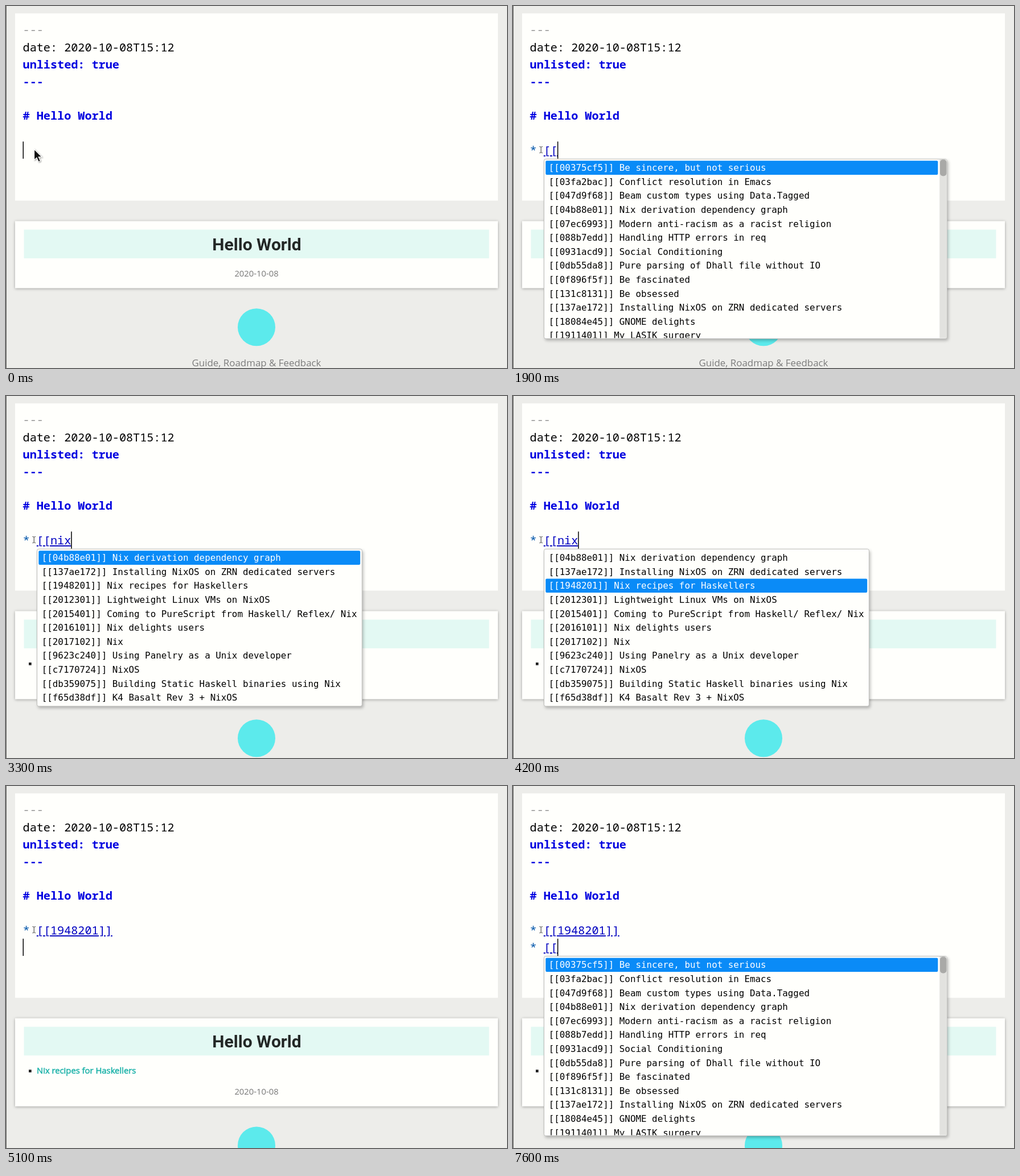
An HTML page that plays this animation: 880 by 637 pixels, repeating every 8000 ms.

```html
<!DOCTYPE html>
<html lang="en">
<head>
<meta charset="utf-8">
<title>Note editor with link completion</title>
<style>
html, body { margin: 0; width: 100%; height: 100%; overflow: hidden; background: #ededea; }
svg { display: block; width: 880px; height: 637px; }
text { white-space: pre; }
.code { font: 20.16px "Noto Sans Mono", "DejaVu Sans Mono", monospace; }
.head { font-weight: 700; fill: #0000e0; }
.link { fill: #0000c0; text-decoration: underline; }
.hint { font: 15.87px "DejaVu Sans Mono", monospace; }
.body { font-family: "Open Sans", "Noto Sans", sans-serif; font-size: 14.8px; }
.title { font: 700 30px Roboto, sans-serif; fill: #232726; }
.mid { text-anchor: middle; }
.card { filter: drop-shadow(0 1px 2.5px rgba(0, 0, 0, .32)); }
.popup { filter: drop-shadow(2px 3px 2.5px rgba(0, 0, 0, .25)); }
</style>
</head>
<body>
<svg id="stage" viewBox="0 0 880 637" xmlns="http://www.w3.org/2000/svg"></svg>
<script>
const LOOP = 8000, LINE = 30.2, CHAR = 12.1, LEFT = 29.6;
const HINT_CHAR = 9.553, ROW = 24.6, MAX_POPUP = 316;
const PAPER = '#fffffc';

const notes = [
  '00375cf5 Be sincere, but not serious',
  '03fa2bac Conflict resolution in Emacs',
  '047d9f68 Beam custom types using Data.Tagged',
  '04b88e01 Nix derivation dependency graph',
  '07ec6993 Modern anti-racism as a racist religion',
  '088b7edd Handling HTTP errors in req',
  '0931acd9 Social Conditioning',
  '0db55da8 Pure parsing of Dhall file without IO',
  '0f896f5f Be fascinated',
  '131c8131 Be obsessed',
  '137ae172 Installing NixOS on ZRN dedicated servers',
  '18084e45 GNOME delights',
  '1911401 My LASIK surgery',
  '1948201 Nix recipes for Haskellers',
  '2012301 Lightweight Linux VMs on NixOS',
  '2015401 Coming to PureScript from Haskell/ Reflex/ Nix',
  '2016101 Nix delights users',
  '2017102 Nix',
  '5b21c9e4 Monitoring long running services with alerting',
  '73d0a6f2 Notes on structured concurrency and resource scope in Rust',
  '9623c240 Using Panelry as a Unix developer',
  'c7170724 NixOS',
  'db359075 Building Static Haskell binaries using Nix',
  'f65d38df K4 Basalt Rev 3 + NixOS'
].map(s => {
  const cut = s.indexOf(' ');
  return { label: `[[${s.slice(0, cut)}]]${s.slice(cut)}`, title: s.slice(cut + 1).toLowerCase() };
});

// Each step changes only the listed parts of the state.
const start = { first: '', second: null, caret: true, arrow: true, query: null, pick: 0, preview: '' };
const steps = [
  [100, { caret: false }],
  [200, { arrow: false }],
  [600, { caret: true }],
  [800, { first: '*' }],
  [1100, { first: '* ' }],
  [1900, { first: '* [[', query: '' }],
  [2400, { preview: '[[nix' }],
  [2700, { caret: false }],
  [2900, { first: '* [[n', query: 'n', caret: true }],
  [3100, { first: '* [[ni', query: 'ni' }],
  [3300, { first: '* [[nix', query: 'nix' }],
  [3900, { caret: false }],
  [4200, { caret: true, pick: 2 }],
  [4500, { first: '* [[1948201]]', query: null, pick: 0 }],
  [5100, { second: '', preview: 'Nix recipes for Haskellers' }],
  [5700, { caret: false }],
  [6200, { caret: true }],
  [6600, { second: '*' }],
  [6900, { second: '* ' }],
  [7400, { second: '* [', query: '' }],
  [7600, { second: '* [[' }]
];

const rect = (x, y, w, h, fill, extra = '') =>
  `<rect x="${x}" y="${y}" width="${w}" height="${h}" fill="${fill}" ${extra}/>`;
const text = (x, y, s, cls, extra = '') =>
  `<text x="${x}" y="${y}" class="${cls}" ${extra}>${s.replace(/&/g, '&amp;')}</text>`;
const codeLine = (row, s, cls = '', col = 0) =>
  text(LEFT + col * CHAR, 49.3 + row * LINE, s, 'code ' + cls);

function listLine(row, s) {
  if (!s) return '';
  const star = text(LEFT, 49.3 + row * LINE, '*', 'code', s.length > 1 ? 'fill="#0055aa"' : '');
  return star + (s.length > 2 ? codeLine(row, s.slice(2), 'link', 2) : '');
}

function editor(s) {
  const row = s.second === null ? 7 : 8;
  const cols = (s.second ?? s.first).length;
  return rect(16, 13, 848, 329.5 + (row - 7) * LINE, PAPER)
    + text(LEFT, 49.3, '---', 'code', 'fill="#999"')
    + codeLine(1, 'date: 2020-10-08T15:12')
    + codeLine(2, 'unlisted: true', 'head')
    + codeLine(3, '---', 'head')
    + codeLine(5, '# Hello World', 'head')
    + listLine(7, s.first) + listLine(8, s.second)
    + (s.caret ? rect(LEFT - 0.1 + cols * CHAR, 238.5 + (row - 7) * LINE, 1.5, 30.2, '#000') : '');
}

function preview(s) {
  const top = 378.5 + (s.second === null ? 0 : LINE);
  const bottom = top + (s.preview ? 155 : 118);
  const isLink = s.preview.startsWith('Nix');
  const look = isLink ? 'fill="#1fb3aa" stroke="#1fb3aa" stroke-width=".55"' : 'fill="#222"';
  return rect(16, top, 848, bottom - top, PAPER, 'class="card"')
    + rect(31.5, top + 15, 817, 50.5, '#e3f9f3')
    + text(440.5, top + 51.5, 'Hello World', 'title mid')
    + (s.preview ? rect(40, top + 90.5, 4.7, 4.7, '#222') + text(54, top + 97, s.preview, 'body', look) : '')
    + text(440, bottom - 21, '2020-10-08', 'body mid', 'fill="#777"')
    + `<circle cx="440" cy="${bottom + 68.7}" r="33" fill="#5ceaec"/>`
    + text(440, bottom + 137.7, 'Guide, Roadmap & Feedback', 'body mid', 'fill="#7c7c7c" style="font-size:16.9px"');
}

function popup(s) {
  if (s.query === null) return '';
  const found = notes.filter(n => n.title.includes(s.query));
  const full = found.length * ROW + 6;
  const scroll = full > MAX_POPUP;
  const h = Math.min(full, MAX_POPUP);
  const selW = Math.max(...found.map(n => n.label.length)) * HINT_CHAR + 10.8;
  const x = 54.5, y = 269.3 + (s.second === null ? 0 : LINE);
  const w = selW + 6 + (scroll ? 12.7 : 0);
  const thumb = s.query.length > 1 ? h * h / full : 29 + 3 * s.query.length;
  const rows = found.map((n, i) => {
    const top = y + 3 + i * ROW;
    const on = i === s.pick;
    return (on ? rect(57.3, top, selW, ROW, '#0a8bf7', 'rx="2"') : '')
      + text(62.7, top + 17.9, n.label, 'hint', `fill="${on ? '#fff' : '#000'}"`);
  }).join('');
  const bar = scroll
    ? rect(x + w - 13, y + .5, 12.5, h - 1, '#e2e2df') + rect(x + w - 12.2, y + 1, 11.4, thumb, '#a9a9a7', 'rx="5"')
    : '';
  return `<clipPath id="list">${rect(x, y, w, h - 1, '#000')}</clipPath>`
    + rect(x, y, w, h, PAPER, 'rx="3" stroke="#bcbcba" class="popup"')
    + `<g clip-path="url(#list)">${rows}${bar}</g>`;
}

const pointer = arrow => arrow
  ? '<path d="M49.5 252v19l4.4-4 3.2 7.2 3.4-1.5-3.2-7h5.7z" fill="#111" stroke="#fff" stroke-width="1.2" style="filter:drop-shadow(1px 1px 1px #0006)"/>'
  : '<path d="M46.5 247.5q2 0 2.7 1 .7-1 2.7-1M49.2 248.5v9M46.5 258.500q2 0 2.7-1 .7 1 2.7 1" fill="none" stroke="#333"/>';

const stage = document.getElementById('stage');
let shown = -1;

function draw(t) {
  const count = steps.filter(([at]) => at <= t).length;
  if (count === shown) return;
  shown = count;
  const s = Object.assign({}, start, ...steps.slice(0, count).map(step => step[1]));
  stage.innerHTML = rect(0, 0, 880, 637, '#ededea') + rect(0, 0, 1, 637, '#6a6a68')
    + editor(s) + preview(s) + popup(s) + pointer(s.arrow);
}

const begin = performance.now();
function tick() {
  draw((performance.now() - begin) % LOOP);
  requestAnimationFrame(tick);
}
tick();
</script>
</body>
</html>
```
